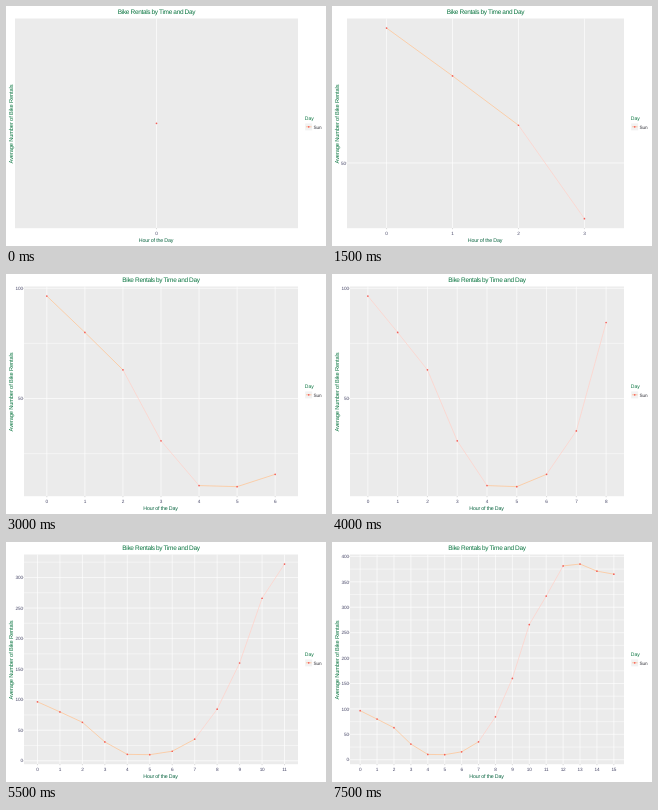
Write an HTML page that moves like this. It is 320x240 px and loops after 8 s.

```html
<!DOCTYPE html>
<html lang="en">
<head>
<meta charset="utf-8">
<title>Bike Rentals by Time and Day</title>
<style>
  html, body { margin: 0; width: 100%; height: 100%; overflow: hidden; background: #fff; }
  svg { display: block; width: 320px; height: 240px; }
  text {
    font-family: "Liberation Sans", Arial, sans-serif;
    font-size: 4.7px;
    letter-spacing: -0.2px;
    fill: #484868;
    text-rendering: geometricPrecision;
  }
  .head { font-size: 6.5px; letter-spacing: -0.35px; fill: #0a7540; }
  .axis { font-size: 5.3px; letter-spacing: -0.18px; fill: #0a6540; }
  .side { font-size: 5.7px; letter-spacing: -0.13px; fill: #0a7540; }
  .key { font-size: 5.1px; letter-spacing: -0.05px; fill: #0a7540; }
  .item { letter-spacing: -0.1px; fill: #303038; }
</style>
</head>
<body>
<svg id="chart" viewBox="0 0 320 240"></svg>
<script>
const STEP = 500;
const RENTALS = [96.5, 80, 63, 30.8, 10.5, 10, 15.6, 35.3, 84.5, 160, 266, 322, 381.3, 385, 371, 365];
const TOP = 12.5, BOTTOM = 222.2, RIGHT = 292;
const chart = document.getElementById('chart');

function add(tag, attrs, content) {
  const el = document.createElementNS('http://www.w3.org/2000/svg', tag);
  for (const key in attrs) el.setAttribute(key, attrs[key]);
  if (content !== undefined) el.textContent = content;
  chart.append(el);
}

const line = (x1, y1, x2, y2, stroke, width) =>
  add('line', { x1, y1, x2, y2, stroke, 'stroke-width': width });

const label = (x, y, content, anchor, name = '') =>
  add('text', { x, y, 'text-anchor': anchor, class: name }, content);

const dot = (cx, cy) => add('circle', { cx, cy, r: 0.85, fill: '#f4605a' });

function multiples(first, step, low, high) {
  const list = [];
  for (let v = first; v <= high; v += step) if (v >= low) list.push(v);
  return list;
}

function draw(count) {
  chart.replaceChildren();
  const data = RENTALS.slice(0, count);
  const min = Math.min(...data), max = Math.max(...data);
  const pad = (max - min) * 0.05 || 1;
  const low = min - pad, high = max + pad;

  const major = multiples(0, 50, low, high);
  const minor = major.length > 1 ? multiples(25, 50, low, high) : [];
  const digits = major.length ? String(major[major.length - 1]).length : 0;
  const left = [9, 12, 15, 18][digits];
  const middle = (left + RIGHT) / 2;

  // Hours are categories with 0.6 of a slot free at each end.
  const slot = (RIGHT - left) / (count + 0.2);
  const px = hour => left + slot * (hour + 0.6);
  const py = v => BOTTOM - (v - low) / (high - low) * (BOTTOM - TOP);

  add('rect', { x: left, y: TOP, width: RIGHT - left, height: BOTTOM - TOP, fill: '#ebebeb' });
  for (const v of minor) line(left, py(v), RIGHT, py(v), '#fff', 0.45);
  for (const v of major) {
    const y = py(v);
    line(left, y, RIGHT, y, '#fff', 0.65);
    line(left - 0.9, y, left, y, '#888', 0.35);
    label(left - 1.2, y + 1.7, v, 'end');
  }
  data.forEach((_, hour) => {
    const x = px(hour);
    line(x, TOP, x, BOTTOM, '#fff', 0.65);
    line(x, BOTTOM, x, BOTTOM + 1, '#888', 0.35);
    label(x, 228.8, hour, 'middle');
  });

  for (let i = 1; i < count; i++) {
    const y1 = py(data[i - 1]), y2 = py(data[i]);
    const steep = Math.abs(y2 - y1) > slot;
    line(px(i - 1), y1, px(i), y2, steep ? '#ffd2ca' : '#ffc594', 0.75);
  }
  data.forEach((v, hour) => dot(px(hour), py(v)));

  label(middle, 8.4, 'Bike Rentals by Time and Day', 'middle', 'head');
  label(middle - 0.5, 236.1, 'Hour of the Day', 'middle', 'axis');
  add('text', { transform: 'translate(6.8 118) rotate(-90)', 'text-anchor': 'middle', class: 'side' },
    'Average Number of Bike Rentals');

  label(298.8, 114.3, 'Day', 'start', 'key');
  add('rect', { x: 299.2, y: 117.4, width: 7, height: 7, fill: '#f2f2f2' });
  line(300, 120.8, 305.6, 120.8, '#ffb890', 0.75);
  dot(302.7, 120.8);
  label(307.5, 122.6, 'Sun', 'start', 'item');
}

let shown = 0;
function tick() {
  const count = Math.floor(performance.now() / STEP) % RENTALS.length + 1;
  if (count !== shown) draw(shown = count);
  requestAnimationFrame(tick);
}
tick();
</script>
</body>
</html>
```
